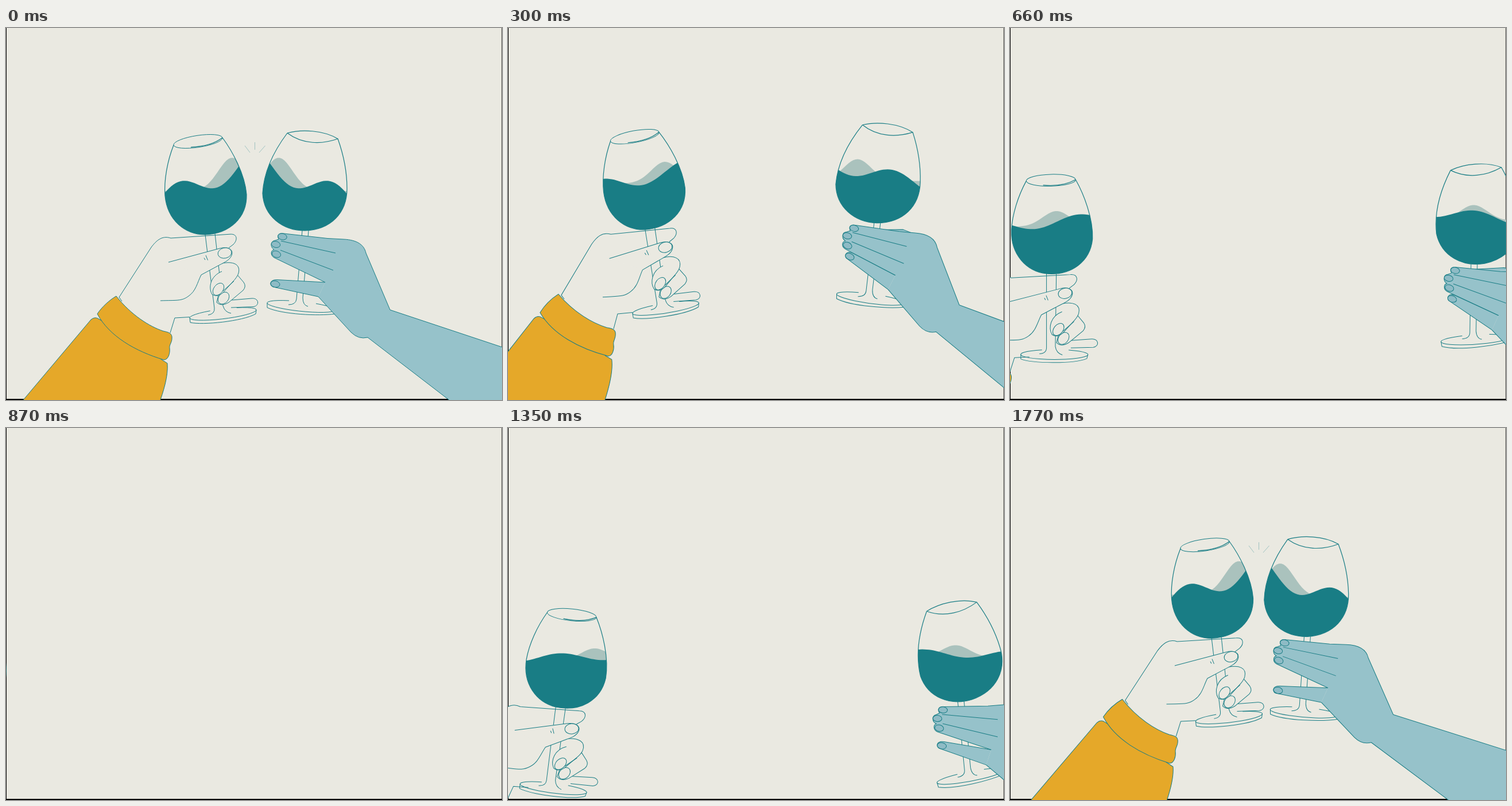
Animation, 864 px wide and 648 px high, one loop 1.8 s. Source, as an HTML page with a canvas:

```html
<!DOCTYPE html>
<html lang="en">
<head>
<meta charset="utf-8">
<title>Cheers</title>
<style>
html, body { margin: 0; width: 100%; height: 100%; overflow: hidden; background: #000; }
canvas { display: block; width: 100vw; height: 100vh; }
</style>
</head>
<body>
<canvas id="stage" width="864" height="648"></canvas>
<script>
const ctx = document.getElementById('stage').getContext('2d');
const LOOP = 1800, STEP = 30;
const PAPER = '#eae9e1', TEAL = '#197d85', MIST = '#aac2bd';
const GOLD = '#e5a829', SKIN = '#96c2ca', NAIL = '#8ebbc5';
const P = d => new Path2D(d);

// Path of each hand: time, dx, dy, angle in degrees
const leftHand = {
  pivot: [381, 392],
  path: [
    [0, 0, 0, 0], [170, -51, -21, -2], [300, -107, -10, -2], [510, -189, 29, -1.4],
    [1020, -470, 160, 7], [1350, -270, 132, 7.8], [1590, 3, 66, 6], [1770, 4, 6.5, 0.3]
  ]
};
const rightHand = {
  pivot: [470, 377],
  path: [
    [0, 0, 0, 0], [170, 56, -32, 2.2], [300, 121, -15, 1.9], [510, 199, 18, 1.2],
    [1020, 480, 155, -7], [1350, 278, 129, -7.3], [1590, 39, 73, -5.7], [1770, -3, 11, -0.8]
  ]
};

const leftGlass = {
  side: 1, turn: 1000, heart: [348, 275], root: [370, 492],
  bowl: P('M292 204C281 232 275 265 277 292C281 335 312 360 347 360C390 358 420 330 419 290C416 254 394 214 377 191'),
  rim: P('M322 207.6Q358 206 377 191'),
  lip: [334.5, 197.5, 43, 10.3, -8.5],
  stem: P('M347 360L363 488Q364 498 352 500M364 358L378 484Q381 495 392 497'),
  foot: [378, 498, 58.5, 8.6, -7],
  footEdge: P('M320 505L321 513C342 518 412 511 435 498L436 491')
};
const rightGlass = {
  side: -1, turn: 1350, heart: [521, 275], root: [510, 482],
  bowl: P('M490 183C466 215 449 252 447 288C449 328 482 353 521 353C566 351 594 322 594 280C594 250 587 218 578 193'),
  rim: P('M490 183C515 176 553 178 578 193C550 203 517 203 490 183'),
  stem: P('M516 353L506 472Q505 482 492 482M527 353L517 470Q517 483 526 485'),
  foot: [514, 485, 59.5, 8.4, 6],
  footEdge: P('M455 479L455 487C480 499 545 502 573 498L573 491')
};

const shape = {
  sleeve: P('M148 508Q155 502 162 507L200 530L262 566L270 577L281 584C283 606 274 634 266 656L180 900L-222 947Z'),
  cuff: P('M192 467C218 500 250 520 274 528C284 530 290 532 289 541C289 548 284 552 285 558C286 566 283 578 275 578C225 563 180 537 159 498C167 486 180 474 192 467Z'),
  palm: P('M197 472L253 382C262 370 272 361 287 366L395 359C404 360 402 372 390 383L340 430L320 504L294 505L286 531L240 530Z'),
  palmLine: P('M202 476L197 469L253 382C262 370 272 361 287 366L390 359.2C403 358 404 369 396 377L388 383M286 531L294 505L320 503.5'),
  little: P('M393 474L428 471C441 470 442 484 431 485.5L392 487'),
  thumb: P('M283 408L372 384C386 380 397 385 393 396C389 406 378 409 366 416L340 430C333 444 331 458 318 467C306 476 298 474 269 475'),
  thumbFill: P('M283 408L372 384C386 380 397 385 393 396C389 406 378 409 366 416L340 430Z'),
  ticks: P('M345 400.5L347 404M348 396L351.5 404.5'),
  fingerLow: P('M403 430L414 443Q419 450 413 457L388 478Q375 486 367 478L370 465'),
  fingerTop: P('M376 410C395 406 409 411 405 427Q403 434 394 443L378 461Q368 470 359 464C352 452 356 432 376 424'),
  crease: P('M397 441L378 458'),
  hand: P('M556 443L467 400C460 396 461 387 467 386C460 382 460 371 469 370L475 368C471 360 476 356.5 484 358L560 366.5L588 368C612 369 624 378 627 392L669 491L1159 654L1092 894L630 539Q614 543 601 530L544 468'),
  knuckles: P('M479 371L574 392M478 387L570 422'),
  backThumb: P('M500 366L516 362L567 360L592 369L592 376L500 374Z'),
  spark: P('M416 205L425 217M433.5 199V212M451.5 205L441 217')
};

const rad = d => d * Math.PI / 180;

function smooth(a, b, t) {
  const u = Math.min(1, Math.max(0, (t - a) / (b - a)));
  return u * u * (3 - 2 * u);
}

// Rises from 0 to 1 between a and b, falls back between c and d
const swell = (t, a, b, c, d) => smooth(a, b, t) * (1 - smooth(c, d, t));

// Liquid is thrown up by the clink and then settles
const splash = t => Math.exp(-t / 400) + smooth(1450, 1770, t);

// Smooth looping curve through the keys
function spline(keys, t) {
  const n = keys.length;
  let i = n - 1;
  while (keys[i][0] > t) i--;
  const at = k => keys[(k + n) % n];
  const time = k => at(k)[0] + LOOP * Math.floor(k / n);
  const slope = (k, c) => {
    const h0 = time(k) - time(k - 1), h1 = time(k + 1) - time(k);
    const d0 = (at(k)[c] - at(k - 1)[c]) / h0, d1 = (at(k + 1)[c] - at(k)[c]) / h1;
    return (d0 * h1 + d1 * h0) / (h0 + h1);
  };
  const span = time(i + 1) - time(i), u = (t - time(i)) / span;
  const u2 = u * u, u3 = u2 * u;
  return [1, 2, 3].map(c =>
    (2 * u3 - 3 * u2 + 1) * at(i)[c] + (3 * u2 - 2 * u3) * at(i + 1)[c] +
    span * ((u3 - 2 * u2 + u) * slope(i, c) + (u3 - u2) * slope(i + 1, c)));
}

function spin([x, y], deg) {
  ctx.translate(x, y);
  ctx.rotate(rad(deg));
  ctx.translate(-x, -y);
}

function group(fn) {
  ctx.save();
  fn();
  ctx.restore();
}

function ink(path, fill, width = 1) {
  if (fill) { ctx.fillStyle = fill; ctx.fill(path); }
  if (width) { ctx.lineWidth = width; ctx.strokeStyle = TEAL; ctx.stroke(path); }
}

function oval(x, y, rx, ry, deg, fill, from = 0, to = 2 * Math.PI) {
  const p = new Path2D();
  p.ellipse(x, y, rx, ry, rad(deg), from, to);
  ink(p, fill);
}

function liquid(color, height) {
  ctx.beginPath();
  ctx.moveTo(-100, 150);
  for (let x = -100; x <= 100; x += 4) ctx.lineTo(x, height(x));
  ctx.lineTo(100, 150);
  ctx.fillStyle = color;
  ctx.fill();
}

function drawLiquid(g, t) {
  const c = splash(t);
  const crest = 24 - g.side * t / 12;
  const peak = 46 - 40 * swell(t, 200, 520, g.turn, g.turn + 240);
  const o = ctx.getTransform().transformPoint(new DOMPoint(...g.heart));
  ctx.setTransform(g.side, 0, 0, 1, o.x, o.y - 5);
  liquid(MIST, x => 6 + 8 * c - (20 + 38 * c) * Math.exp(-(((x - peak) / 34) ** 2)));
  liquid(TEAL, x => -c * (0.5 * x + 4) + (6 + 16 * c) * Math.cos((x - crest) * 2 * Math.PI / 150));
}

function drawGlass(g, t, lean) {
  group(() => {
    spin(g.root, lean / 3);
    ink(g.stem);
  });
  group(() => {
    spin(g.root, lean);
    oval(...g.foot, null, -0.36 * Math.PI, 1.38 * Math.PI);
    ink(g.footEdge);
  });
  group(() => {
    spin(g.heart, lean);
    group(() => {
      ctx.clip(g.bowl);
      drawLiquid(g, t);
    });
    ink(g.bowl, null, 1.2);
    ink(g.rim, null, 1.2);
    if (g.lip) oval(...g.lip);
  });
}

function follow(hand, t) {
  const [x, y, deg] = spline(hand.path, t);
  ctx.translate(x, y);
  spin(hand.pivot, deg);
}

function drawLeft(t) {
  follow(leftHand, t);
  ink(shape.palm, PAPER, 0);
  ink(shape.palmLine);
  ink(shape.little, PAPER);
  ink(shape.sleeve, GOLD);
  ink(shape.cuff, GOLD);
  group(() => {
    spin([364, 370], 6.5 * swell(t, 300, 510, 1350, 1700));
    drawGlass(leftGlass, t, 0);
  });
  ink(shape.fingerLow, PAPER);
  oval(379, 470.5, 8.5, 11.5, 38, PAPER);
  ink(shape.fingerTop, PAPER);
  ink(shape.crease);
  oval(370, 455, 8, 12, 38, PAPER);
  ink(shape.thumbFill, PAPER, 0);
  ink(shape.thumb);
  oval(381, 392, 12, 9, -12, PAPER);
  ink(shape.ticks);
}

function drawPinky(deg) {
  const c = Math.cos(rad(deg)), s = Math.sin(rad(deg));
  const turn = (x, y) => [555 + (x - 555) * c - (y - 446) * s, 446 + (x - 555) * s + (y - 446) * c];
  const p = new Path2D();
  p.moveTo(556, 443);
  p.lineTo(...turn(472, 438.5));
  p.bezierCurveTo(...turn(458, 438), ...turn(459, 449), ...turn(465, 451));
  p.lineTo(544, 468);
  ink(p, SKIN);
  oval(...turn(469, 446), 8, 5.5, 12 + deg * 0.4, NAIL);
}

function drawRight(t) {
  follow(rightHand, t);
  drawGlass(rightGlass, t, -9.5 * swell(t, 300, 720, 1530, 1800));
  group(() => {
    ctx.translate(0, 12 - 12 * swell(t, 0, 440, 900, 1200));
    ink(shape.backThumb, SKIN);
  });
  drawPinky(22.5 * swell(t, 60, 300, 1200, 1560));
  ink(shape.hand, SKIN);
  ink(shape.knuckles);
  oval(481.5, 363.5, 7.8, 5.4, 12, NAIL);
  oval(470, 377, 7.8, 5.4, 12, NAIL);
  oval(471, 394, 7.8, 5.6, 20, NAIL);
}

function draw(t) {
  ctx.setTransform(1, 0, 0, 1, 0, 0);
  ctx.fillStyle = '#000';
  ctx.fillRect(0, 0, 864, 648);
  ctx.fillStyle = PAPER;
  ctx.fillRect(1, 0, 862.4, 646);
  if (t < 90 || t >= 1740) group(() => {
    ctx.globalAlpha = 0.35;
    ink(shape.spark);
  });
  group(() => drawLeft(t));
  group(() => drawRight(t));
}

ctx.lineJoin = 'round';
const start = performance.now();
function tick() {
  const t = (performance.now() - start) % LOOP;
  draw(Math.floor(t / STEP) * STEP);
  requestAnimationFrame(tick);
}
tick();
</script>
</body>
</html>
```
